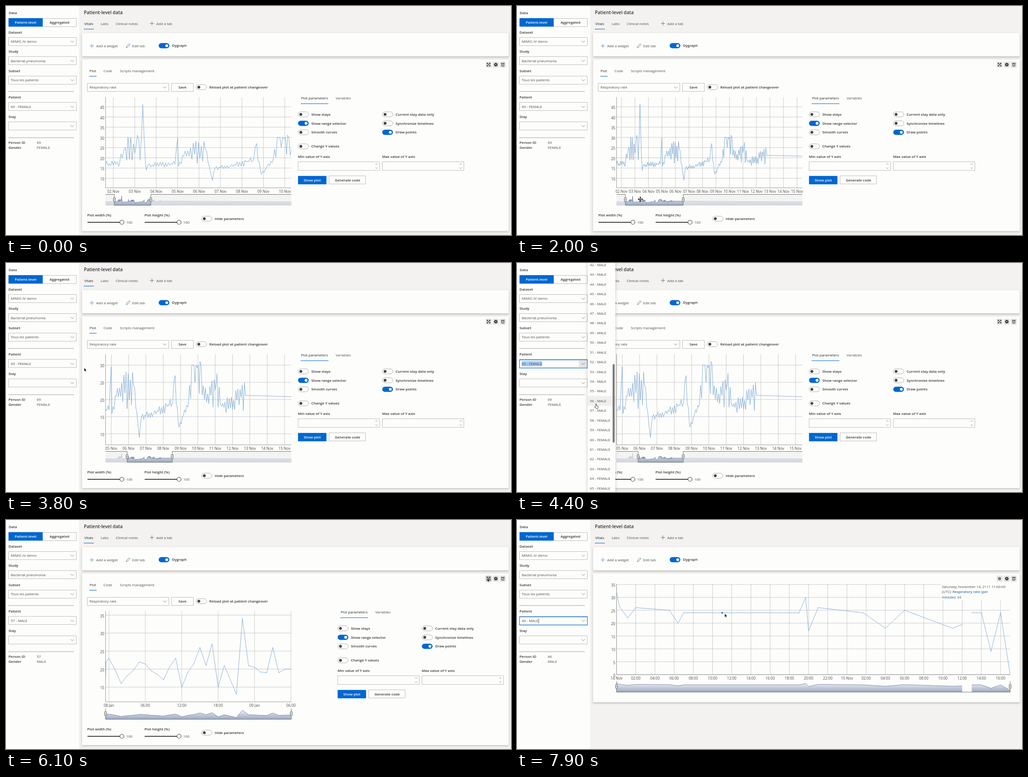
These frames come from a looping animation (1109 by 505 pixels, 8 s). An HTML page with a canvas:

```html
<!DOCTYPE html>
<html lang="en">
<head>
<meta charset="utf-8">
<title>Patient-level data</title>
<style>
html, body { margin: 0; width: 100%; height: 100%; overflow: hidden; background: #f4f2f0; }
canvas { display: block; }
</style>
</head>
<body>
<canvas id="stage" width="1109" height="505"></canvas>
<script>
const ctx = document.getElementById('stage').getContext('2d');
const BLUE = '#0067d0', INK = '#333', TEXT = '#4c4c4c', EDGE = '#bdbdbd', WHITE = '#fdfdfb', CURVE = '#72a3d2';
const LOOP = 8000, ROW = 21.43, LEFT = 218.6;

// ---- drawing helpers ----
function setFont(bold, size) {
  ctx.font = `${bold ? 600 : 400} ${size}px "Open Sans", "Noto Sans", sans-serif`;
}
function text(s, x, y, { bold = false, size = 7.9, color = bold ? INK : TEXT, align = 'left' } = {}) {
  setFont(bold, size);
  ctx.fillStyle = color;
  ctx.textAlign = align;
  ctx.fillText(s, x, y + size * 0.36);
  return ctx.measureText(s).width;
}
const label = (s, x, y) => text(s, x, y, { bold: true });
function box(x, y, w, h, fill, stroke, radius = 0, width = 1) {
  ctx.beginPath();
  ctx.roundRect(x, y, w, h, radius);
  if (fill) { ctx.fillStyle = fill; ctx.fill(); }
  if (stroke) { ctx.strokeStyle = stroke; ctx.lineWidth = width; ctx.stroke(); }
}
// A box whose one-pixel border sits on the pixel grid.
const frame = (x, y, w, h, stroke = EDGE, width = 1) =>
  box(Math.floor(x) + 0.5, Math.floor(y) + 0.5, w, h, WHITE, stroke, 0, width);
function line(points, color = TEXT, width = 1) {
  ctx.beginPath();
  for (const p of points) ctx.lineTo(...p);
  ctx.strokeStyle = color;
  ctx.lineWidth = width;
  ctx.stroke();
}
function dot(x, y, r, fill, stroke) {
  ctx.beginPath();
  ctx.arc(x, y, r, 0, 7);
  if (fill) { ctx.fillStyle = fill; ctx.fill(); }
  if (stroke) { ctx.strokeStyle = stroke; ctx.lineWidth = 1.2; ctx.stroke(); }
}
function shape(points, fill, stroke) {
  ctx.beginPath();
  for (const p of points) ctx.lineTo(...p);
  ctx.closePath();
  ctx.fillStyle = fill;
  ctx.fill();
  if (stroke) { ctx.strokeStyle = stroke; ctx.lineWidth = 0.8; ctx.stroke(); }
}
function card(x, y, w, h, blur = 4, dy = 1.5) {
  ctx.save();
  ctx.shadowColor = 'rgba(0,0,0,.24)';
  ctx.shadowBlur = blur;
  ctx.shadowOffsetY = dy;
  box(x, y, w, h, WHITE);
  ctx.restore();
}

// ---- widgets ----
const chevron = (x, y, r = 3.5, dir = 1) =>
  line([[x - r, y - r * dir / 2], [x, y + r * dir / 2], [x + r, y - r * dir / 2]], '#777', 0.9);
function toggle(x, y, on, caption) {
  if (on) box(x + 0.3, y - 5.8, 23.4, 11.6, BLUE, null, 5.8);
  else box(x + 0.5, y - 5.5, 23, 11, WHITE, '#a8a8a8', 5.5, 0.9);
  dot(x + (on ? 18 : 6.5), y, 3.1, on ? '#fff' : '#444');
  label(caption, x + 29.5, y);
}
function select(x, y, w, value) {
  frame(x, y - 9.5, w, 18);
  text(value, x + 5, y);
  chevron(x + w - 9, y);
}
function button(x, y, w, caption, primary) {
  if (primary) box(x + 0.3, y - 9.3, w + 0.4, 18.6, BLUE);
  else frame(x, y - 9.5, w, 18);
  text(caption, x + w / 2 + 0.5, y, { bold: true, color: primary ? '#fff' : INK, align: 'center' });
}
function plus(x, y, color = '#666') {
  line([[x - 4.5, y], [x + 4.5, y]], color, 0.9);
  line([[x, y - 4.5], [x, y + 4.5]], color, 0.9);
}
function tabs(y, [barX, barWidth], items) {
  items.forEach(([s, x], i) => text(s, x, y, { color: i ? TEXT : '#222' }));
  box(barX, y + 11.4, barWidth, 1.1, BLUE);
}
function slider(x, caption) {
  label(caption, x, 461);
  line([[x + 0.5, 477], [x + 72, 477]], '#444', 1.8);
  dot(x + 76, 477, 4.5, WHITE, '#444');
  text('100', x + 85.5, 477);
}

// ---- data: [hour, value] counted from the first midnight ----
let seed = 11;
const random = () => (seed = seed * 16807 % 2147483647) / 2147483647;
// Joins key points with samples every `step` hours; the zigzag grows with the level.
function sample(keys, step, jitter) {
  const out = [];
  keys.forEach(([h, v], i) => {
    out.push([h, v]);
    const [nextH, nextV] = keys[i + 1] || [h, v], span = nextH - h;
    if (span > 100) return;
    for (let d = step, sign = 1; d < span - step / 2; d += step, sign = -sign) {
      const base = v + (nextV - v) * d / span, swing = jitter * Math.max(1, (base - 15) * 0.7);
      out.push([h + d, Math.min(30, base + sign * swing * random())]);
    }
  });
  return out;
}
const series = {
  69: { start: Date.UTC(2201, 10, 1), lo: -35.1, hi: 1025, runs: [sample([
    [-35, 18], [15, 17], [31, 17], [36, 24], [49, 24], [51, 31], [54, 19], [57, 46], [61, 14], [63, 16.5],
    [93, 17], [96, 29.5], [97, 16], [103, 21], [127, 24], [135, 9], [138, 15], [155, 16], [181, 19], [183, 25.5],
    [190, 12], [196, 15.5], [203, 19], [209, 30], [219, 31], [225, 20], [241, 24], [249, 18], [282, 21.2],
    [985, 17], [1025, 17]], 1.5, 1)] },
  57: { start: Date.UTC(2110, 0, 8), lo: -0.56, hi: 30.05, runs: [sample([
    [-0.56, 17], [-0.47, 22], [0, 23], [2, 16], [5, 22], [9, 17], [11, 23], [12, 15], [15, 26], [16, 21],
    [17, 27], [18, 15], [19, 21], [21, 13], [22, 34], [23, 21], [26, 19], [27, 26], [28, 19], [30, 20]], 1, 0.2)] },
  46: { start: Date.UTC(2111, 10, 14), lo: 0, hi: 41, runs: [sample([
    [0, 32], [0.3, 26.5], [1.15, 22], [2, 26], [5.5, 25], [6.4, 20], [7, 24], [19, 24], [19.7, 30], [20, 17],
    [21, 26], [25.7, 24], [28, 18], [30, 25], [35, 18], [36, 19.5]], 1, 0),
    [[37, 24], [38, 24], [39, 9], [40, 24], [41, 0]]] }
};

// ---- timeline: cursor stops as [arrive, leave, x, y] ----
const stops = [[1000, 1000, 340, 400], [1200, 1200, 318, 426], [1800, 1800, 365, 426], [2100, 2100, 238, 426],
  [2500, 2500, 266, 426], [2900, 3400, 392, 298], [3900, 4100, 146, 223], [4500, 5000, 178, 327],
  [6000, 6200, 1057, 128], [6700, 6800, 146, 223], [7000, 7000, 148, 328], [7200, 7400, 174, 347], [7800, LOOP, 456, 206]];
function ramp(t, a, b) {
  const u = Math.min(1, Math.max(0, (t - a) / (b - a)));
  return u * u * (3 - 2 * u);
}
function cursorAt(t) {
  const i = stops.findLastIndex(stop => stop[0] <= t);
  if (i < 0) return null;
  const [, leave, x, y] = stops[i], [arrive, , nextX, nextY] = stops[i + 1] || [LOOP + 1, 0, x, y];
  const u = ramp(t, leave, arrive);
  return { x: x + (nextX - x) * u, y: y + (nextY - y) * u };
}

// ---- plot ----
function plot(id, full, t, cursor) {
  const s = series[id], right = full ? 1083 : 626.5, top = full ? 141 : 201, bottom = top + 200, width = right - LEFT;
  const from = id === 69 ? 238 + 28 * ramp(t, 2100, 2500) : LEFT;
  const to = id === 69 ? 318 + 47 * ramp(t, 1200, 1800) : right;
  const hourAt = x => s.lo + (x - LEFT) / width * (s.hi - s.lo);
  const lo = hourAt(from), hi = hourAt(to);
  const X = h => LEFT + (h - lo) / (hi - lo) * width;
  const shown = s.runs.flat().filter(p => p[0] >= lo - 0.01 && p[0] <= hi + 0.01), values = shown.map(p => p[1]);
  const min = Math.min(...values), max = Math.max(...values), pad = (max - min) / 10;
  const yLo = Math.max(0, min - pad), yHi = max + pad;
  const Y = v => bottom - (v - yLo) / (yHi - yLo) * 200;

  for (let v = Math.ceil(yLo / 5) * 5; v <= yHi; v += 5) {
    line([[LEFT, Y(v)], [right, Y(v)]], '#c3c3d3', 0.9);
    text(v, 216, Y(v) + 2, { align: 'right', size: 8.1 });
  }
  const step = id === 69 ? 24 : full ? 2 : 6;
  for (let h = Math.ceil(lo / step) * step; h <= hi; h += step) {
    line([[X(h), top], [X(h), bottom]], '#c6c6c6', 0.9);
    const date = new Date(s.start + h * 36e5), hour = String(date.getUTCHours()).padStart(2, '0');
    const day = String(date.getUTCDate()).padStart(2, '0') + (id === 57 ? ' Jan' : ' Nov');
    text(hour === '00' ? day : hour + ':00', X(h), bottom + 8, { align: 'center', size: 8.1 });
  }
  line([[LEFT, top], [LEFT, bottom], [right, bottom]], '#8c8c8c', 0.9);

  ctx.save();
  ctx.beginPath();
  ctx.rect(LEFT, top, width, 200.5);
  ctx.clip();
  for (const run of s.runs) line(run.map(([h, v]) => [X(h), Y(v)]), CURVE, 0.85);
  for (const [h, v] of shown) dot(X(h), Y(v), 0.6, CURVE);
  ctx.restore();

  if (cursor && cursor.x > LEFT && cursor.x < right && cursor.y > top && cursor.y < bottom) {
    const distance = p => Math.abs(X(p[0]) - cursor.x + 3);
    const near = shown.reduce((a, b) => distance(b) < distance(a) ? b : a);
    tooltip(s, near, right - 150, top);
    dot(X(near[0]), Y(near[1]), 1.9, '#2f6fb8');
  }
  rangeSelector(s, right, top + 214.5, from, to);
}
function tooltip(s, [h, v], x, y) {
  const date = new Date(s.start + Math.round(h) * 36e5), plain = { size: 7.8 };
  const strong = { bold: true, color: '#2f72b9', size: 7.8 };
  const day = date.toLocaleDateString('en-US', { weekday: 'long', month: 'long', day: '2-digit', year: 'numeric', timeZone: 'UTC' });
  box(x - 2, y, 152, 35, WHITE);
  text(`${day} ${date.toISOString().slice(11, 19)}`, x, y + 6, plain);
  const lead = text('(UTC): ', x, y + 17.5, plain);
  text('Respiratory rate (per', x + lead, y + 17.5, strong);
  const end = text('minute)', x, y + 29, strong);
  text(': ' + Math.round(v * 2) / 2, x + end, y + 29, plain);
}
function rangeSelector(s, right, top, from, to) {
  const bottom = top + 24, values = s.runs.flat().map(p => p[1]);
  const min = Math.min(...values), max = Math.max(...values), pad = (max - min) / 4;
  const X = h => LEFT + (h - s.lo) / (s.hi - s.lo) * (right - LEFT);
  const Y = v => bottom - (v - min + pad) / (max - min + 2 * pad) * 24;
  const fill = ctx.createLinearGradient(0, top, 0, bottom);
  fill.addColorStop(0, '#fff');
  fill.addColorStop(1, '#9ba8bf');
  for (const run of s.runs) {
    const curve = run.map(([h, v]) => [X(h), Y(v)]);
    shape([[curve[0][0], bottom], ...curve, [curve.at(-1)[0], bottom]], fill);
    line(curve, '#7486aa', 0.9);
  }
  for (const [a, b] of [[LEFT, from], [to, right]]) box(a, top, b - a, 24, 'rgba(238,238,238,.66)');
  line([[LEFT, top], [from, top], [from, bottom], [to, bottom], [to, top], [right, top]], '#666', 0.9);
  for (const x of [from, to]) {
    box(x - 2.2, top + 7, 4.4, 9, '#eee', '#555', 1, 0.9);
    line([[x, top + 9], [x, top + 14]], '#777', 0.7);
  }
}

// ---- page regions ----
const gender = id => id > 57 ? 'FEMALE' : 'MALE';

function sidebar(patient, open, focused) {
  const value = `${patient} - ${gender(patient)}`, pitch = 42.5;
  box(0, 0, 160.5, 505, WHITE);
  label('Data', 6, 15.5);
  frame(80, 27, 74, 18);
  box(5.5, 26.8, 75, 18.8, BLUE);
  text('Patient-level', 43, 36.3, { bold: true, color: '#fff', align: 'center' });
  text('Aggregated', 117.5, 36.3, { bold: true, align: 'center' });
  const field = (name, y, v) => { label(name, 5.5, y - 20.6); select(5.5, y, 149, v); };
  ['MIMIC-IV demo', 'Bacterial pneumonia', 'Tous les patients']
    .forEach((v, i) => field(['Dataset', 'Study', 'Subset'][i], 78.5 + i * pitch, v));
  field('Patient', 222.2, value);
  field('Stay', 264.7, '');
  if (focused) {
    frame(5, 213, 149, 18, '#2a7fd0', 1.3);
    setFont(false, 7.9);
    const w = ctx.measureText(value).width;
    if (open) {
      box(10.5, 216.5, w, 11.5, '#a5cbf2');
      box(136, 214.2, 17.5, 16.6, '#e5e3e5');
    } else line([[11.5 + w, 217], [11.5 + w, 228]], '#333', 0.8);
    text(value, 10.5, 222.2);
    chevron(145.5, 222.2);
  }
  for (const y of [188.5, 290.5]) line([[5, y], [149, y]], '#999', 0.9);
  label('Person ID', 5.5, 301);
  label('Gender', 5.5, 312.5);
  text(patient, 67.5, 301);
  text(gender(patient), 67.5, 312.5);
}
function header() {
  text('Patient-level data', 171, 14.8, { bold: true, size: 10.1 });
  tabs(39, [171, 22], [['Vitals', 172], ['Labs', 208], ['Clinical notes', 241], ['Add a tab', 330]]);
  plus(320.5, 38.5);
  card(167, 60, 937, 51);
  plus(188.5, 88, '#5585bd');
  text('Add a widget', 198, 88);
  line([[264, 92], [265, 89], [270.5, 83], [272.5, 85], [267, 91], [264, 92]], '#4a7ab5', 0.9);
  text('Edit tab', 277, 88);
  toggle(335, 87.5, true, 'Dygraph');
}
function actions(full, pressed) {
  const y = 129.3, [arrows, gear, bin] = [1059.7, 1075.6, 1091], dark = '#222', back = '#e4e2e2';
  for (const x of [arrows, gear, bin]) box(x - 6.5, 122.7, 13, 13.3, pressed && x === arrows ? '#c8c6c8' : back, null, 2);
  const tip = full ? 1 : 3.2, arm = full ? 2.9 : 1;
  for (const [dx, dy] of [[1, 1], [1, -1], [-1, 1], [-1, -1]]) {
    line([[arrows, y], [arrows + dx * 3, y + dy * 3]], full ? back : dark, 1);
    line([[arrows + dx * arm, y + dy * tip], [arrows + dx * tip, y + dy * tip], [arrows + dx * tip, y + dy * arm]], dark, 1.2);
  }
  for (let a = 0; a < 4; a++) {
    const c = Math.cos(a * Math.PI / 4) * 4, s = Math.sin(a * Math.PI / 4) * 4;
    line([[gear - c, y - s], [gear + c, y + s]], dark, 1.6);
  }
  dot(gear, y, 2.9, dark);
  dot(gear, y, 1.2, back);
  box(bin - 2.7, 127, 5.4, 6, null, '#333', 1, 0.9);
  line([[bin - 4, 126.3], [bin + 4, 126.3]], '#333');
  for (const dx of [-0.8, 0.8]) line([[bin + dx, 128.5], [bin + dx, 131.8]], '#333', 0.6);
}
function settings(x) {
  const rows = [239, 258.7, 278.5, 309.5], second = x + 185;
  tabs(203.5, [x + 6, 61], [['Plot parameters', x + 7], ['Variables', x + 83]]);
  ['Show stays', 'Show range selector', 'Smooth curves', 'Change Y values'].forEach((s, i) => toggle(x, rows[i], i === 1, s));
  ['Current stay data only', 'Synchronize timelines', 'Draw points'].forEach((s, i) => toggle(second, rows[i], i === 2, s));
  for (const [s, left] of [['Min', x], ['Max', second]]) {
    label(s + ' value of Y axis', left, 332);
    frame(left, 343.5, 179, 19);
    chevron(left + 172.5, 348.5, 2.2, -1);
    chevron(left + 172.5, 357.5, 2.2);
  }
  button(x, 384, 62, 'Show plot', true);
  button(x + 68.5, 384, 80, 'Generate code');
}
function controls(shift) {
  tabs(143, [183, 16], [['Plot', 183.5], ['Code', 214], ['Scripts management', 250]]);
  select(178.5, 179.5, 179, 'Respiratory rate');
  button(363, 179.5, 48, 'Save');
  toggle(417, 179, false, 'Reload plot at patient changeover');
  settings(641 + shift);
  slider(178.5, 'Plot width (%)');
  slider(304, 'Plot height (%)');
  toggle(429, 469, false, 'Hide parameters');
}
function patientList(first, cursor) {
  card(155, -5, 61, 515, 6, 0);
  const hovered = cursor.x > 155 ? Math.round((cursor.y - 4) / ROW) : -1;
  for (let i = 0; i < 24; i++) {
    const y = 4 + i * ROW;
    if (i === hovered) box(155, y - 10.7, 61, ROW, '#f1efee');
    text(`${first + i} - ${gender(first + i)}`, 160, y);
  }
  box(210, 223 + (first - 42) * 6.33, 4.5, 173, '#7d7d7d', null, 2);
}
function drawCursor({ x, y }, kind) {
  ctx.save();
  ctx.translate(x, y);
  if (kind === 'move') {
    for (let i = 0; i < 4; i++, ctx.rotate(Math.PI / 2)) {
      line([[0, 0], [4, 0]], '#111', 1.2);
      shape([[6, 0], [3, 2], [3, -2]], '#111');
    }
  } else if (kind === 'hand') {
    shape([[0, 0], [1.4, 0], [1.6, 4], [5, 4.7], [4.8, 10], [0.2, 10], [-2.8, 6.3], [-0.4, 6.8]], '#fff', '#222');
  } else {
    shape([[0, 0], [0, 8.5], [1.9, 6.9], [3.3, 10], [4.6, 9.4], [3.3, 6.5], [5.8, 6.3]], '#111', '#fff');
  }
  ctx.restore();
}

function render(t) {
  const patient = t < 4800 ? 69 : t < 7300 ? 57 : 46;
  const plotted = t < 5000 ? 69 : t < 7400 ? 57 : 46;
  const open = t >= 4000 && t < 4800 || t >= 6800 && t < 7300;
  const focused = t >= 4000 && t < 6000 || t >= 6800;
  const full = t >= 6200, cursor = cursorAt(t);

  box(0, 0, 1109, 505, '#f4f2f0');
  header();
  card(167, 118, 937, full ? 284 : 378.5);
  actions(full, t >= 6000 && t < 6300);
  if (!full) controls(plotted === 57 ? 87 : 0);
  plot(plotted, full, t, open ? null : cursor);
  sidebar(patient, open, focused);
  if (open) patientList(patient - 27, cursor);
  if (cursor) {
    const onRange = !full && cursor.x > LEFT && cursor.x < 627 && cursor.y > 415 && cursor.y < 440;
    drawCursor(cursor, onRange ? 'move' : open && cursor.x > 155 ? 'hand' : 'arrow');
  }
}

const began = performance.now();
function tick() {
  const t = (performance.now() - began) % LOOP;
  render(Math.floor(t / 100) * 100);
  requestAnimationFrame(tick);
}
tick();
</script>
</body>
</html>
```
